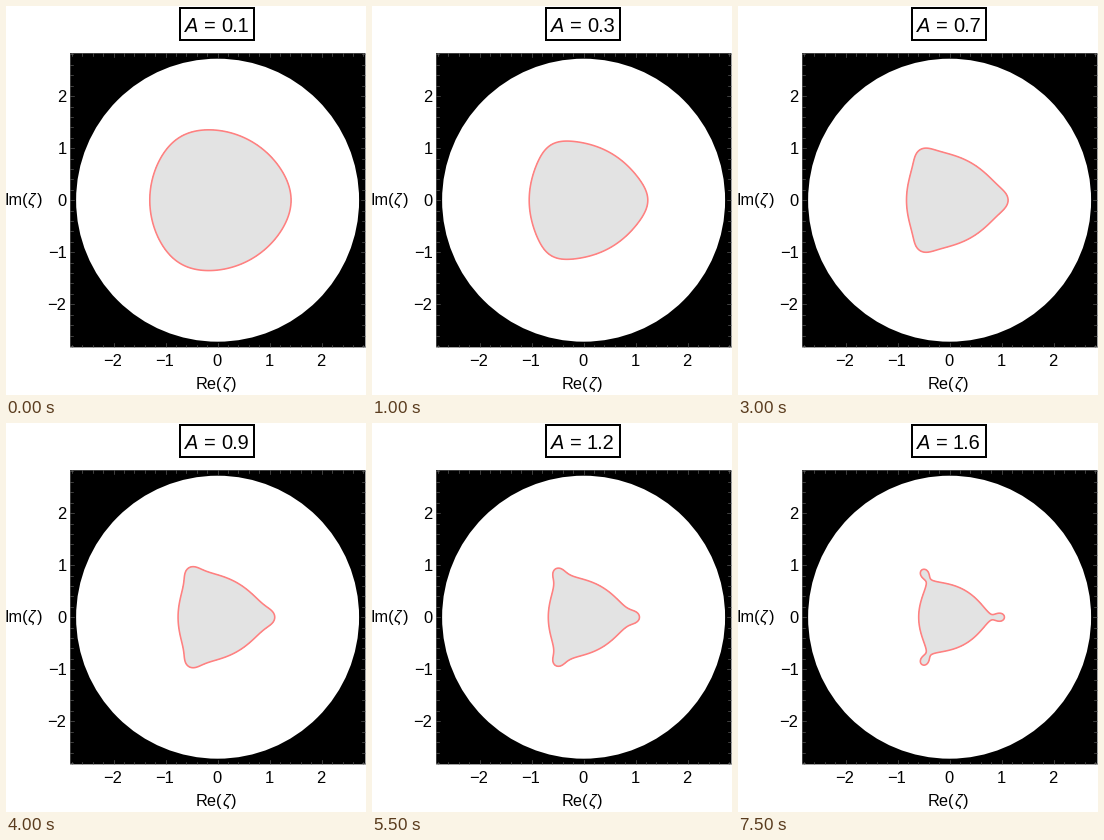
Recreate the animation shown at these times as a matplotlib script. Size 360 by 389 pixels, loop 8 s.

```python
import numpy as np
import matplotlib.pyplot as plt
from matplotlib.animation import FuncAnimation
from matplotlib.patches import Circle, Rectangle

W, H, DPI = 360, 389, 100
PX = 72 / DPI                    # points per pixel
CX, CY, UNIT = 211.6, 194.2, 52.05
HALF = 1.04 * np.e * UNIT        # half the plot range in pixels
LOG_C = -0.84

plt.rcParams["font.family"] = "Liberation Sans"
fig = plt.figure(figsize=(W / DPI, H / DPI), dpi=DPI, facecolor="white")
ax = fig.add_axes([0, 0, 1, 1])
ax.set_xlim(0, W)
ax.set_ylim(H, 0)
ax.axis("off")


def label(x, y, s, size=16.5, ha="left", style="normal"):
    return ax.text(x, y, s, fontsize=size * PX, ha=ha, va="baseline",
                   style=style, color="black")


def zeta_label(x, y, name, width):
    label(x, y, name + "(", 16.3)
    label(x + width, y, "ζ", 16.3, style="italic")
    label(x + width + 8.5, y, ")", 16.3)


def draw_frame():
    left, top = CX - HALF, CY - HALF
    ax.add_patch(Rectangle((left, top), 2 * HALF, 2 * HALF, fc="black", ec="none", zorder=0))
    ax.add_patch(Circle((CX, CY), np.e * UNIT, fc="white", ec="none", zorder=1))
    ax.add_patch(Rectangle((left, top), 2 * HALF, 2 * HALF, fill=False,
                           ec="0.4", lw=0.6 * PX, zorder=4))
    for i in range(-14, 15):
        d = i * UNIT / 5
        size = 4 if i % 5 == 0 else 2.5
        style = dict(color="0.4", lw=0.6 * PX, zorder=4)
        for side in (-1, 1):
            edge, inner = side * HALF, side * (HALF - size)
            ax.plot([CX + d] * 2, [CY + edge, CY + inner], **style)
            ax.plot([CX + edge, CX + inner], [CY + d] * 2, **style)
    for n in range(-2, 3):
        s = str(n).replace("-", "\u2212")
        label(CX - 0.8 + n * UNIT, 360, s, ha="center")
        label(60.5, CY + 5.8 - n * UNIT, s, ha="right")
    zeta_label(190, 383, "Re", 26.5)
    zeta_label(-1, 199, "Im", 23)


# log-magnitude field whose level sets give the outline for each A
xs = np.linspace(-1.6, 1.6, 641)
X, Y = np.meshgrid(xs, xs)
Z = X + 1j * Y
L = np.log(np.maximum(np.abs(Z), 0.05))
FIELD = (np.log(np.abs(Z**3 - 1) + 1e-9) - 6 * np.log(np.maximum(1 - L, 1e-6)) - 1.5 * L)
GX, GY = CX + UNIT * X, CY - UNIT * Y

draw_frame()
box = ax.add_patch(Rectangle((174, 2), 74, 32, fill=False, ec="black", lw=2 * PX))
title_a = label(0, 26, "A", 20, style="italic")
title_eq = label(0, 26, "=", 20)
title_num = label(0, 26, "", 20)
shapes = []


def set_title(tenths):
    text = f"{tenths / 10:.1f}" if tenths % 10 else f"{tenths // 10}."
    text_w = 36.1 + 11.12 * (len(text) - 1) + 5.56
    x = 211 - text_w / 2
    title_a.set_x(x)
    title_eq.set_x(x + 18.9)
    title_num.set_x(x + 35.8)
    title_num.set_text(text)
    box.set_x(x - 5.2)
    box.set_width(text_w + 10.4)


def update(i):
    while shapes:
        shapes.pop().remove()
    tenths = i + 1
    level = LOG_C - 1.5 * np.log(tenths / 10)
    shapes.append(ax.contourf(GX, GY, FIELD, levels=[-100, level],
                              colors=["#e3e3e3"], zorder=2))
    shapes.append(ax.contour(GX, GY, FIELD, levels=[level], colors=["#ff8080"],
                             linewidths=1.6 * PX, linestyles="solid", zorder=3))
    set_title(tenths)
    return []


anim = FuncAnimation(fig, update, frames=16, interval=500, repeat=True,
                     repeat_delay=0, blit=False)
plt.show()
```
